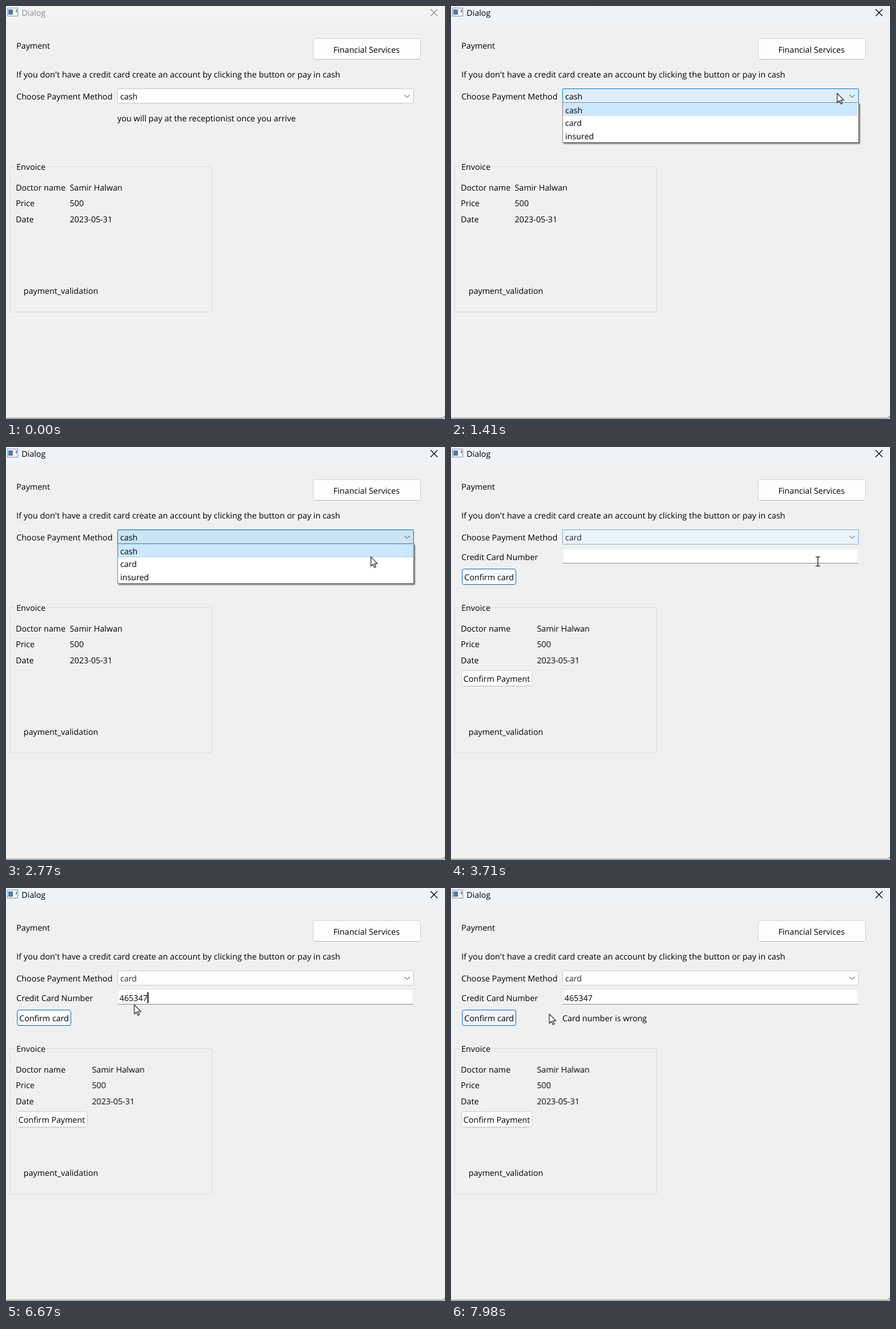
Animation of 761 by 716 pixels, one loop 8000 ms. Source, as an HTML page:

```html
<!DOCTYPE html>
<html lang="en">
<head>
<meta charset="utf-8">
<title>Payment dialog</title>
<style>
  html, body { margin: 0; width: 100%; height: 100%; overflow: hidden; background: #f0f0f0; }
  svg { display: block; width: 761px; height: 716px; color: #000; }
  text {
    font: 14.15px "Open Sans", "Noto Sans", sans-serif;
    fill: currentColor;
    text-rendering: geometricPrecision;
    white-space: pre;
  }
  .wide { font-size: 14.32px; }
  .mid { text-anchor: middle; }
  .button { fill: #fdfdfd; stroke: #d0d0d0; }
  .edge { stroke: #b9b9b9; }
  .line { fill: none; stroke: currentColor; }
  .idle { color: #8c8c8c; }

  /* Hard switches; 1% of the loop is 80 ms */
  .idle, .active, .early, .late, .values, .mark, .typed, .caret, .error, .arrow, .beam {
    animation: 8s step-end infinite;
  }
  .idle { animation-name: deactivate; }
  .active { animation-name: activate; }
  .early { animation-name: hide; }
  .late { animation-name: show; }
  .values { animation-name: values; }
  .mark { animation-name: mark; }
  .typed { animation-name: typed; }
  .caret { animation-name: caret; }
  .error { animation-name: error; }
  .arrow { animation-name: arrow; }
  .beam { animation-name: beam; }

  @keyframes deactivate { 0% { opacity: 1 } 14.25%, 100% { opacity: 0 } }
  @keyframes activate { 0% { opacity: 0 } 14.25%, 100% { opacity: 1 } }
  @keyframes hide { 0% { opacity: 1 } 42.25%, 100% { opacity: 0 } }
  @keyframes show { 0% { opacity: 0 } 42.25%, 100% { opacity: 1 } }
  @keyframes values {
    0% { transform: none }
    42.25%, 100% { transform: translateX(38.5px) }
  }
  @keyframes mark {
    0% { transform: none; stroke: none }
    23.5% { transform: none; stroke: #99d1ff }
    25.4% { transform: translateY(22.7px); stroke: #99d1ff }
    27.1% { transform: translateY(45.3px); stroke: #99d1ff }
    29.5% { transform: translateY(22.7px); stroke: #99d1ff }
    33.75% { transform: none; stroke: #99d1ff }
    35.5%, 100% { transform: translateY(22.7px); stroke: #99d1ff }
  }
  @keyframes typed {
    0% { transform: none }
    70% { transform: translateX(8.1px) }
    70.875% { transform: translateX(16.2px) }
    73.375% { transform: translateX(24.3px) }
    74.25% { transform: translateX(32.4px) }
    75% { transform: translateX(40.5px) }
    75.875%, 100% { transform: translateX(48.6px) }
  }
  @keyframes caret { 0% { opacity: 0 } 63.125% { opacity: 1 } 92%, 100% { opacity: 0 } }
  @keyframes error { 0% { opacity: 0 } 93.625%, 100% { opacity: 1 } }
  @keyframes arrow {
    0% { opacity: 0 } 3.25% { opacity: 1 } 42.25% { opacity: 0 }
    53.125% { opacity: 1 } 60.5% { opacity: 0 } 83.375%, 100% { opacity: 1 }
  }
  @keyframes beam {
    0% { opacity: 0 } 42.25% { opacity: 1 } 53.125% { opacity: 0 }
    60.5% { opacity: 1 } 83.375%, 100% { opacity: 0 }
  }

  /* Fades and pointer travel */
  .combo { animation: combo 8s linear infinite; }
  .popup { animation: popup 8s linear infinite; }
  .confirm { stroke: #0067c0; animation: confirm 8s linear infinite; }
  .pointer { animation: travel 8s linear infinite; }

  @keyframes combo {
    0%, 8.8% { fill: #fefefe; stroke: #c8c8c8 }
    11.7%, 14.25% { fill: #e5f1fb; stroke: #0078d7 }
    17.6% { fill: #dfeef9; stroke: #0078d7 }
    22%, 42.25% { fill: #cce4f7; stroke: #0067b8 }
    46.4% { fill: #eaf3fb; stroke: #7fadd0 }
    52.2%, 100% { fill: #fefefe; stroke: #c8c8c8 }
  }
  @keyframes popup {
    0%, 15.1% { opacity: 0 }
    16.8%, 42.24% { opacity: 1 }
    42.25%, 100% { opacity: 0 }
  }
  @keyframes confirm {
    0%, 53.5% { fill: #fdfdfd }
    55.5%, 56.5% { fill: #e8f2fb }
    60%, 88% { fill: #fafcfe }
    90.5%, 91.8% { fill: #e5f1fb }
    92.6%, 93.6% { fill: #cce4f7 }
    95.5%, 98% { fill: #e5f1fb }
    99.75%, 100% { fill: #eff5fc }
  }
  @keyframes travel {
    0%, 3.25% { transform: translate(722px, 705px); animation-timing-function: ease-in-out }
    10% { transform: translate(674px, 162px); animation-timing-function: ease-out }
    11.75%, 17.8% { transform: translate(669px, 151px) }
    23.75% { transform: translate(656px, 180px) }
    27.1% { transform: translate(646px, 215px) }
    28.5% { transform: translate(643px, 217px) }
    30.375%, 33.7% { transform: translate(632px, 196px) }
    33.8%, 35.4% { transform: translate(632px, 190px) }
    36.375%, 42.24% { transform: translate(634px, 197px) }
    42.25%, 47% { transform: translate(636px, 198px); animation-timing-function: ease-in }
    52.25% { transform: translate(300px, 197px) }
    53.9% { transform: translate(135px, 220px) }
    55.2% { transform: translate(92px, 229px) }
    56.5% { transform: translate(112px, 222px) }
    58.875% { transform: translate(258px, 175px) }
    61.375%, 83.37% { transform: translate(260px, 187px) }
    83.375%, 84% { transform: translate(222px, 202px); animation-timing-function: ease-in-out }
    91%, 98% { transform: translate(82px, 223px); animation-timing-function: ease-in-out }
    99.75%, 100% { transform: translate(170px, 218px) }
  }
</style>
</head>
<body>
<svg viewBox="0 0 761 716">
  <defs>
    <linearGradient id="bar">
      <stop offset="0" stop-color="#eff3fb"/>
      <stop offset="1" stop-color="#edf3f9"/>
    </linearGradient>
    <g id="caption">
      <path class="line" d="M736 5.5l12 12m0-12l-12 12" stroke-width="1.2"/>
      <text x="27" y="17">Dialog</text>
    </g>
  </defs>

  <!-- Window -->
  <rect width="761" height="716" fill="#d6d6d6"/>
  <rect x="-12" y="-12" width="774" height="726.5" rx="8" fill="#f0f0f0" stroke="#959595" stroke-width="1.5"/>
  <g class="idle">
    <rect width="761" height="30" fill="#f3f3f3"/>
    <use href="#caption"/>
  </g>
  <g class="active">
    <rect width="761" height="30" fill="url(#bar)"/>
    <use href="#caption"/>
  </g>
  <rect x="2.5" y="3.5" width="18" height="14" fill="#f7f7f7" stroke="#8a8f96"/>
  <rect x="4" y="6" width="8" height="9" fill="#4d7cae"/>
  <rect x="17" y="6" width="2" height="5" fill="#5b86b5"/>

  <!-- Payment form -->
  <text x="18" y="74">Payment</text>
  <rect class="button" x="532.5" y="56.5" width="186" height="36" rx="3"/>
  <path class="edge" d="M535 92.5h181"/>
  <text class="mid" x="625" y="81">Financial Services</text>
  <text class="wide" x="18" y="124">If you don't have a credit card create an account by clicking the button or pay in cash</text>
  <text x="18" y="162">Choose Payment Method</text>
  <rect class="combo" x="193.5" y="143.5" width="513" height="25" rx="1"/>
  <path class="line" d="M691 154l4.5 4.5l4.5-4.5" style="stroke:#333"/>
  <g class="early">
    <text x="198" y="162">cash</text>
    <text class="wide" x="193" y="200">you will pay at the receptionist once you arrive</text>
  </g>

  <!-- Invoice -->
  <rect x="6.5" y="278.5" width="350" height="252" fill="none" stroke="#dcdcdc"/>
  <path d="M15 278.5h55" stroke="#f0f0f0" stroke-width="3"/>
  <text x="18" y="284">Envoice</text>
  <text x="17" y="320">Doctor name</text>
  <text x="17" y="347">Price</text>
  <text x="17" y="375">Date</text>
  <g class="values">
    <text x="110.5" y="320">Samir Halwan</text>
    <text x="110.5" y="347">500</text>
    <text x="110.5" y="375">2023-05-31</text>
  </g>
  <text x="30.5" y="499">payment_validation</text>

  <!-- Card form -->
  <g class="late">
    <text x="198" y="162" style="fill:#2a2a2a">card</text>
    <text x="18" y="196">Credit Card Number</text>
    <rect x="194.5" y="176.5" width="511" height="25" fill="#fff" stroke="#ebebeb"/>
    <path d="M194 201.5h512" stroke="#7d8d96"/>
    <text x="196.8" y="196">465347</text>
    <g class="typed">
      <rect x="196.5" y="179" width="56" height="21" fill="#fff"/>
      <rect class="caret" x="196.4" y="180.5" width="2" height="19"/>
    </g>
    <rect class="button confirm" x="19.5" y="211.5" width="93" height="27" rx="3.5"/>
    <text class="mid" x="66" y="231">Confirm card</text>
    <rect class="button" x="18.5" y="387.5" width="122" height="27" rx="3"/>
    <path class="edge" d="M21 414.5h117"/>
    <text class="mid" x="79.3" y="407">Confirm Payment</text>
    <text class="error" x="193" y="231">Card number is wrong</text>
  </g>

  <!-- Drop-down list -->
  <g class="popup">
    <rect x="193.5" y="167.5" width="513" height="69" fill="#fff" stroke="#7b8288"
          style="filter:drop-shadow(2.5px 2.5px 1px rgba(0,0,0,.55))"/>
    <rect class="mark" x="194.5" y="168.5" width="510" height="22" fill="#cce8ff"/>
    <text x="198" y="186">cash</text>
    <text x="198" y="208">card</text>
    <text x="198" y="231">insured</text>
  </g>

  <!-- Pointer -->
  <g class="pointer">
    <path class="arrow" transform="translate(.5 .5)" fill="#fff" stroke="#000" stroke-width="1.1"
          d="M0 0V16L3.7 12.6L6.2 18.3L8.6 17.2L6.2 11.7H11.3Z"/>
    <path class="beam line" d="M-4 -7.5h3l1 1l1-1h3M0 -6.5v14M-4 8.5h3l1-1l1 1h3" stroke-width="1.2"/>
  </g>
</svg>
</body>
</html>
```
